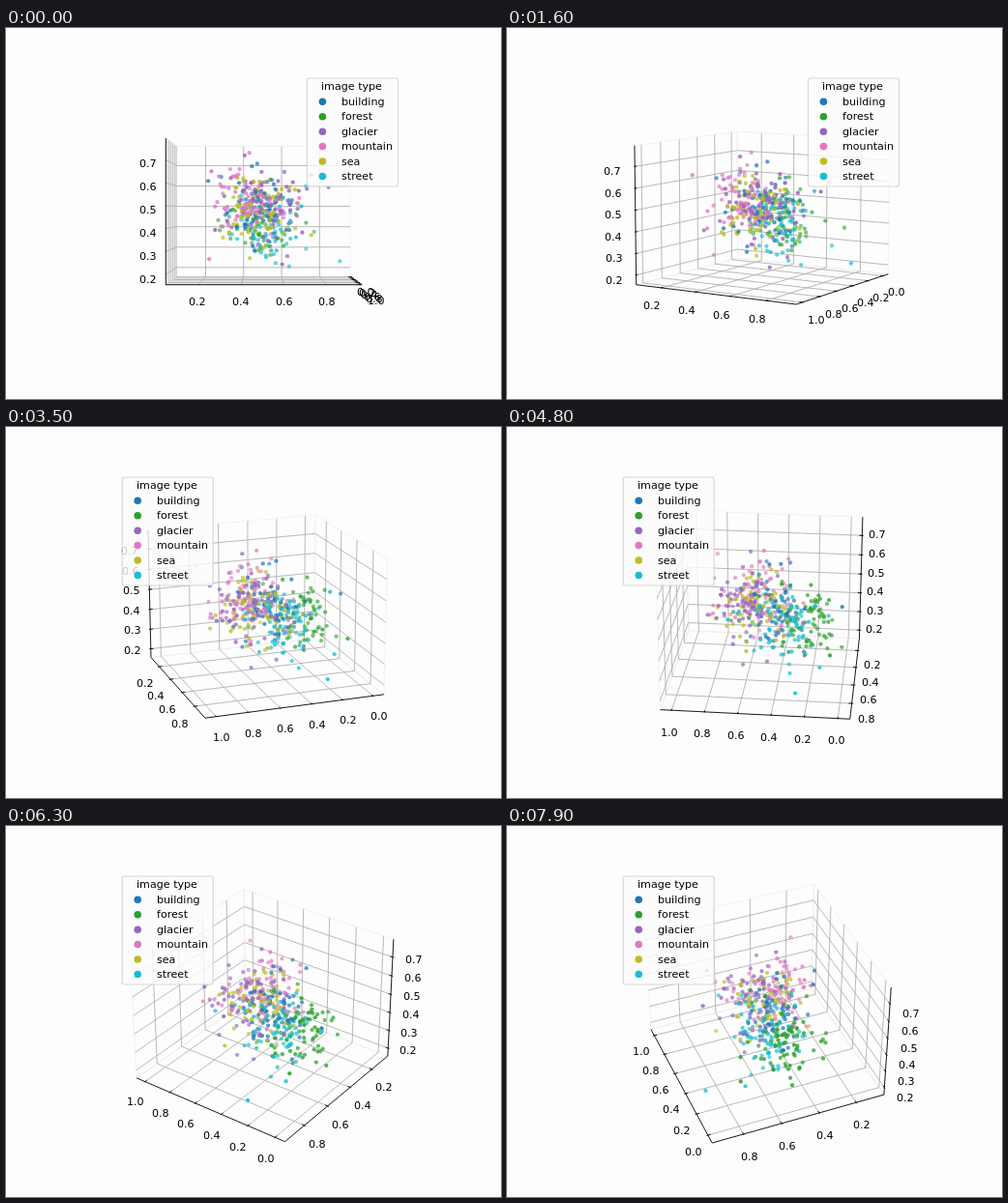
An HTML page with a canvas for the animation above (8000 ms loop, 512 by 384 pixels).

```html
<!DOCTYPE html>
<html lang="en">
<head>
<meta charset="utf-8">
<title>Rotating scatter plot</title>
<style>
  html, body { margin: 0; width: 100%; height: 100%; overflow: hidden; background: #fdfdfd; }
  canvas { display: block; }
</style>
</head>
<body>
<canvas id="plot" width="512" height="384"></canvas>
<script>
const ctx = document.getElementById('plot').getContext('2d');
const FRAMES = 80, STEP = 100, LEGEND_MOVES = 21;
const FONT = '11.11px "DejaVu Sans", sans-serif';
const BACKGROUND = '#fdfdfd', INK = '#000', GRID = '#b0b0b0', PANE = 'rgba(236,236,236,.55)';
const HAIRLINE = 0.89;

// A box of 4 : 4 : 3; labels and ticks are set off in proportion to it
const HALF = [4, 4, 3].map(v => v * 0.1488);
const LABEL_GAP = 0.166, TICK_IN = 0.019, TICK_OUT = 0.0095;
const AXES = [
  { lo: -0.072, hi: 1.068, step: 0.2 },
  { lo: 0.048, hi: 0.962, step: 0.2 },
  { lo: 0.1555, hi: 0.7945, step: 0.1 }
];

// Every group is the same kind of cloud around its own centre
const GROUPS = [
  { name: 'building', color: '#1f77b4', mean: [-0.04, -0.03, 0] },
  { name: 'forest', color: '#2ca02c', mean: [-0.28, -0.04, -0.06] },
  { name: 'glacier', color: '#9467bd', mean: [0.11, 0.05, 0.06] },
  { name: 'mountain', color: '#e377c2', mean: [0.07, -0.12, 0.07] },
  { name: 'sea', color: '#bcbd22', mean: [0.04, 0, 0.03] },
  { name: 'street', color: '#17becf', mean: [-0.11, 0.03, -0.1] }
];
const CLOUD = 70, SPREAD = 0.11;

let seed = 20;
function random() {
  seed = (seed * 16807) % 2147483647;
  return seed / 2147483647;
}
const normal = () => Math.sqrt(-2 * Math.log(random())) * Math.cos(2 * Math.PI * random());

// A few points get a wider reach, which gives the cloud its stragglers
function scatter(mean) {
  const reach = SPREAD * (0.9 + 0.9 * random() ** 5);
  return mean.map((m, i) => Math.max(-0.85 * HALF[i], Math.min(0.85 * HALF[i], m + reach * normal())));
}
const points = GROUPS.flatMap(({ color, mean }) =>
  Array.from({ length: CLOUD }, () => ({ pos: scatter(mean), color })));

// Perspective camera circling the box
function camera(azim, elev) {
  const rad = Math.PI / 180;
  const ca = Math.cos(azim * rad), sa = Math.sin(azim * rad);
  const ce = Math.cos(elev * rad), se = Math.sin(elev * rad);
  return ([x, y, z]) => {
    const toward = ca * x + sa * y;
    const dist = 10 - (ce * toward + se * z);
    const k = 1598.3 / dist;
    return { x: 266.4 + k * (ca * y - sa * x), y: 189.9 - k * (ce * z - se * toward), dist };
  };
}

const put = (p, axis, value) => p.map((v, i) => i === axis ? value : v);
const flip = (p, axis) => put(p, axis, -p[axis]);

function line(project, corners, color, width) {
  ctx.beginPath();
  for (const c of corners) {
    const p = project(c);
    ctx.lineTo(p.x, p.y);
  }
  ctx.strokeStyle = color;
  ctx.lineWidth = width;
  ctx.stroke();
}

function dot(x, y, r, color) {
  ctx.beginPath();
  ctx.arc(x, y, r, 0, 2 * Math.PI);
  ctx.fillStyle = color;
  ctx.fill();
}

function text(string, x, y) {
  ctx.fillStyle = INK;
  ctx.fillText(string, Math.round(x), Math.round(y));
}

function drawPane(project, back, a) {
  const b = (a + 1) % 3, c = (a + 2) % 3;
  const side = flip(back, b);
  line(project, [back, side, flip(side, c), flip(back, c), back], PANE, 1.1);
}

function drawAxis(project, back, a) {
  const { lo, hi, step } = AXES[a];
  const b = (a + 1) % 3, c = (a + 2) % 3;
  const out = a === 0 ? 1 : 0;
  const edge = flip(back, out);
  const side = Math.sign(edge[out]);
  const place = t => HALF[a] * (2 * (t - lo) / (hi - lo) - 1);

  const ticks = [];
  for (let n = Math.ceil(lo / step); n * step < hi; n++) ticks.push(n * step);

  for (const t of ticks) {
    const p = put(back, a, place(t));
    line(project, [flip(p, b), p, flip(p, c)], GRID, HAIRLINE);
  }
  line(project, [edge, flip(edge, a)], INK, HAIRLINE);

  for (const t of ticks) {
    const p = put(edge, a, place(t));
    const tip = offset => put(p, out, p[out] + side * offset);
    line(project, [tip(TICK_OUT), tip(-TICK_IN)], INK, HAIRLINE);
    const at = project(p.map((v, i) => i === a ? v : v * (1 + LABEL_GAP)));
    text(Math.abs(t).toFixed(1), at.x - 9, at.y + 7.9);
  }
}

function drawPoints(project) {
  const seen = points.map(({ pos, color }) => ({ ...project(pos), color }));
  seen.sort((p, q) => q.dist - p.dist);
  const far = seen[0].dist, close = seen[seen.length - 1].dist;
  for (const p of seen) {
    ctx.globalAlpha = 0.93 - 0.43 * (p.dist - close) / (far - close);
    dot(p.x, p.y, 2.15, p.color);
  }
  ctx.globalAlpha = 1;
}

function drawLegend(left) {
  ctx.beginPath();
  ctx.roundRect(left, 52, 94, 112, 2.2);
  ctx.fillStyle = 'rgba(253,253,253,.8)';
  ctx.fill();
  ctx.strokeStyle = 'rgba(204,204,204,.8)';
  ctx.lineWidth = 1.1;
  ctx.stroke();
  text('image type', left + 14.5, 64);
  GROUPS.forEach(({ name, color }, i) => {
    const y = 76.3 + 15.44 * i;
    dot(left + 16, y, 3.8, color);
    text(name, left + 35.5, y + 3.5);
  });
}

function draw(frame) {
  const azim = 2 * frame, elev = frame / 2;
  const project = camera(azim, elev);
  const back = [azim <= 90 ? -HALF[0] : HALF[0], -HALF[1], -HALF[2]];

  ctx.fillStyle = BACKGROUND;
  ctx.fillRect(0, 0, 512, 384);
  ctx.font = FONT;
  for (const a of AXES.keys()) drawPane(project, back, a);
  for (const a of AXES.keys()) drawAxis(project, back, a);
  drawPoints(project);
  drawLegend(frame < LEGEND_MOVES ? 311.4 : 120.2);
}

let shown = -1;
function tick() {
  const frame = Math.floor(performance.now() / STEP) % FRAMES;
  if (frame !== shown) draw(shown = frame);
  requestAnimationFrame(tick);
}
tick();
</script>
</body>
</html>
```
